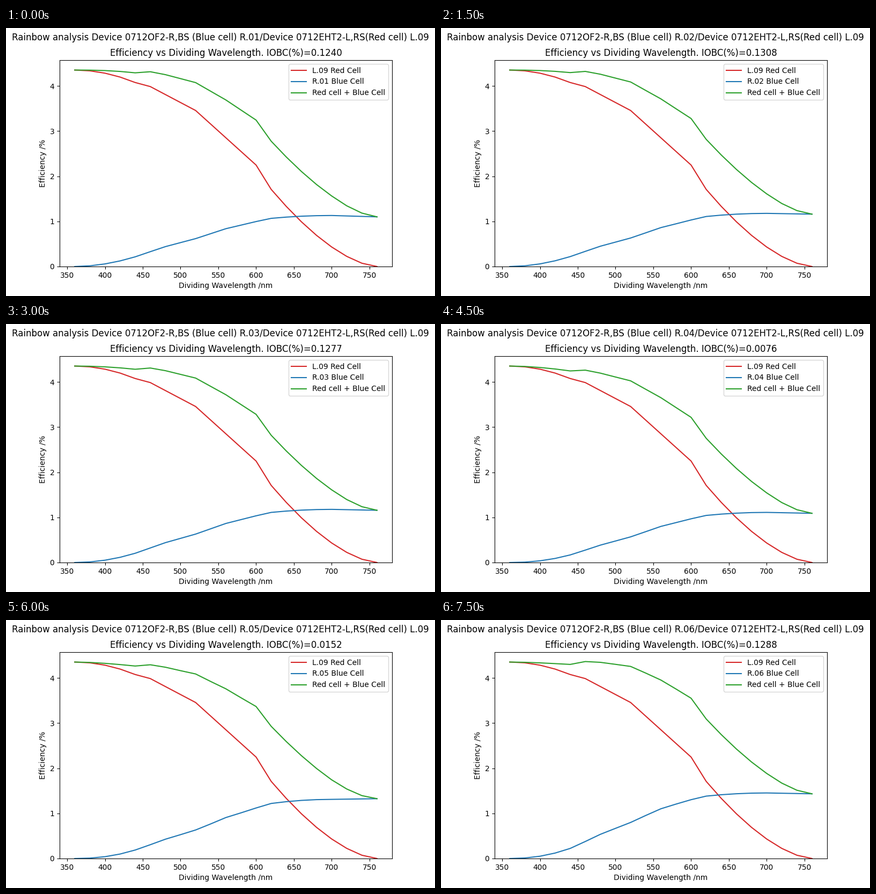
A matplotlib script for the animation above (8000 ms loop, 800 px wide and 500 px high).

```python
import numpy as np
import matplotlib.pyplot as plt
from matplotlib.animation import FuncAnimation

STEP_MS = 500
LOOP_MS = 8000
HOLD = 3  # steps each cell stays on screen

wavelength = np.arange(360, 761, 20)

# IOBC, peak efficiency, efficiency at 760 nm, steepness at 440 nm and at 600 nm
CELLS = [
    (0.1240, 1.130, 1.100, 0.95, 0.98),
    (0.1308, 1.177, 1.160, 0.96, 1.03),
    (0.1277, 1.177, 1.157, 1.00, 1.00),
    (0.0076, 1.110, 1.090, 1.08, 1.06),
    (0.0152, 1.310, 1.325, 1.11, 1.22),
    (0.1288, 1.452, 1.433, 1.07, 0.84),
]


def red_curve(w):
    """Slow quadratic start, straight stretches, then a power-law tail."""
    start = 4.351 - 0.276 * ((w - 360) / 80) ** 2
    middle = np.interp(w, [440, 460, 520, 600, 620],
                       [4.075, 3.985, 3.455, 2.247, 1.708])
    tail = 1.708 * ((760 - w) / 140) ** 1.62
    return np.select([w <= 440, w <= 620], [start, middle], tail)


def rise(w):
    """Common growth of the blue cells, from 0 at 360 nm to 1 at 700 nm."""
    start = 0.174 * ((w - 360) / 80) ** 2
    middle = np.interp(w, [440, 480, 520, 560, 600, 620],
                       [0.174, 0.374, 0.535, 0.735, 0.879, 0.943])
    end = 1 - 0.057 * (np.clip(700 - w, 0, None) / 80) ** 2
    return np.select([w <= 440, w <= 620], [start, middle], end)


def blue_curve(w, peak, last, short, long):
    power = np.interp(w, [440, 600], [short, long])
    level = np.interp(w, [700, 760], [peak, last])
    return level * rise(w) ** power


red = red_curve(wavelength)

fig, ax = plt.subplots(figsize=(8, 5), dpi=100)
heading = fig.suptitle("", y=0.982)
title = ax.set_title("")
ax.set_xlabel("Dividing Wavelength /nm")
ax.set_ylabel("Efficiency /%")
ax.set_xlim(340, 780)
ax.set_ylim(0, 4.57)

ax.plot(wavelength, red, color="tab:red", label="L.09 Red Cell")
blue_line, = ax.plot(wavelength, red, color="tab:blue", label="R.01 Blue Cell")
sum_line, = ax.plot(wavelength, red, color="tab:green", label="Red cell + Blue Cell")
legend = ax.legend(loc="upper right")


def draw(step):
    index = step // HOLD
    iobc, *shape = CELLS[index]
    name = f"R.{index + 1:02d}"
    blue = blue_curve(wavelength, *shape)
    blue_line.set_ydata(blue)
    sum_line.set_ydata(red + blue)
    legend.get_texts()[1].set_text(f"{name} Blue Cell")
    heading.set_text(f"Rainbow analysis Device 0712OF2-R,BS (Blue cell) {name}"
                     "/Device 0712EHT2-L,RS(Red cell) L.09")
    title.set_text(f"Efficiency vs Dividing Wavelength. IOBC(%)={iobc:.4f}")
    return blue_line, sum_line, legend, heading, title


anim = FuncAnimation(fig, draw, frames=LOOP_MS // STEP_MS, interval=STEP_MS,
                     init_func=lambda: draw(0), repeat=True, repeat_delay=0)
plt.show()
```
